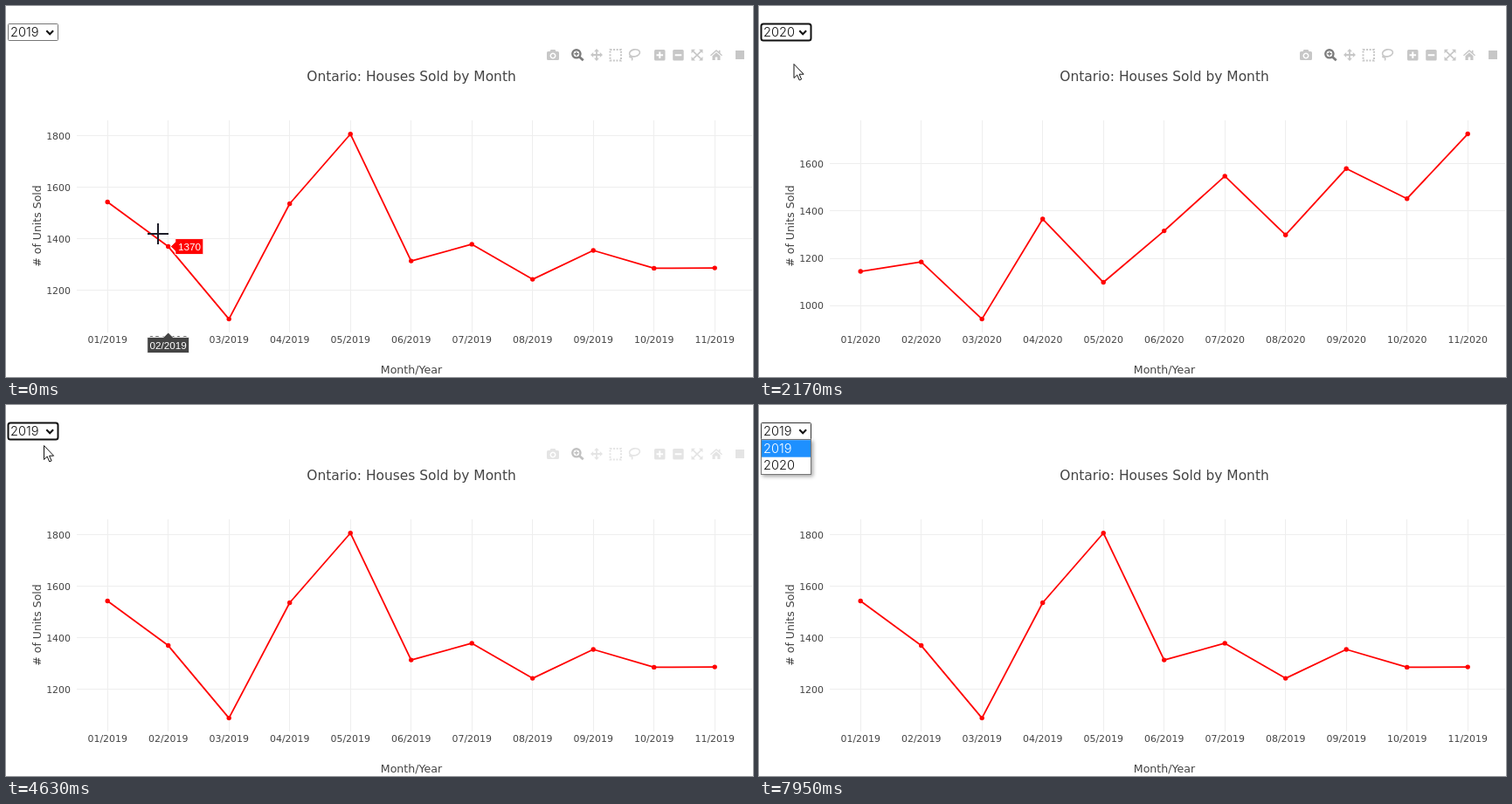
Recreate the animation shown at these times as an HTML page. Size 855 px wide and 425 px high, loop 8430 ms.

```html
<!DOCTYPE html>
<html lang="en">
<head>
<meta charset="utf-8">
<title>Houses sold by month</title>
<style>
  html, body { margin: 0; width: 100%; height: 100%; overflow: hidden; background: #fff; }
  svg { display: block; }
  .chart text, .label { font-family: "DejaVu Sans", Verdana, sans-serif; fill: #444; }
  .tick { font-size: 10.95px; }
  .tip { font: 11.7px "Liberation Sans", Arial, sans-serif; fill: #fff; }
  .pick { font: 300 14.6px Inter, sans-serif; fill: #111; }
</style>
</head>
<body>
<svg id="stage" width="855" height="425" viewBox="0 0 855 425">
  <defs>
    <filter id="shade" x="-30%" y="-30%" width="180%" height="180%">
      <feDropShadow dx="2" dy="2" stdDeviation="2" flood-color="#000" flood-opacity=".35"/>
    </filter>
  </defs>

  <g id="charts"></g>
  <text class="label" x="464" y="86" font-size="15.45" text-anchor="middle">Ontario: Houses Sold by Month</text>
  <text class="label" x="464" y="421" font-size="12.6" text-anchor="middle">Month/Year</text>
  <text class="label" transform="translate(40 252) rotate(-90)" font-size="12.5" text-anchor="middle"># of Units Sold</text>

  <g id="hover">
    <g id="monthTip">
      <path d="M0 374l5.4 5.4h18.6v18.2h-48v-18.2h18.6z" fill="#444" stroke="#fff" stroke-width=".9"/>
      <text id="monthText" class="tip" y="392.7" text-anchor="middle"></text>
    </g>
    <g id="valueTip">
      <path d="M2.7 0l5.4-5.4v-3.6h32v18h-32v-3.6z" fill="#f00" stroke="#fff" stroke-width=".9"/>
      <text id="valueText" class="tip" x="11.3" y="4.2"></text>
    </g>
  </g>

  <g id="tools" fill="#c7c7c7" stroke="none">
    <path fill-rule="evenodd" d="M620.5 52h2l1-2h5l1 2h2q1.500 0 1.500 1.500v7q0 1.500-1.500 1.500h-11q-1.500 0-1.500-1.500v-7q0-1.500 1.500-1.500zM626 53.500a3.500 3.500 0 1 0 .01 0zM626 55a2 2 0 1 1-.01 0z"/>
    <g fill="none" stroke="#7c7c7c">
      <circle cx="652.900" cy="54.800" r="4.600" stroke-width="2.400"/>
      <path d="M656.500 58.500l4.200 3.700" stroke-width="2.800"/>
      <path d="M650.500 54.800h4.800m-2.400-2.400v4.800" stroke-width="1.400"/>
    </g>
    <path d="M676 49l3 3.200h-2.100v2.900h2.900v-2.100l3.200 3-3.200 3v-2.100h-2.900v2.900h2.100l-3 3.200-3-3.200h2.100v-2.900h-2.900v2.100l-3.200-3 3.200-3v2.100h2.900v-2.900h-2.100z"/>
    <rect x="691.500" y="50" width="12.500" height="12.500" fill="none" stroke="#c7c7c7" stroke-width="2" stroke-dasharray="2 1.570"/>
    <g fill="none" stroke="#c7c7c7" stroke-width="1.600">
      <ellipse cx="719.500" cy="53.800" rx="6" ry="4" transform="rotate(-12 719.500 53.800)"/>
      <path d="M715 56.500q-2.500 2 .3 2.300 2.500.5 1 3.500"/>
    </g>
    <rect x="742" y="50" width="12.500" height="12.500" rx="1.500"/>
    <rect x="763.200" y="50" width="12.500" height="12.500" rx="1.500"/>
    <path d="M744.500 56.300h7.600m-3.800-3.800v7.600M765.700 56.300h7.600" stroke="#fff" stroke-width="2"/>
    <path d="M784.500 49.800h4.500l-4.500 4.500zM797.500 49.800v4.500l-4.500-4.500zM784.500 62.500v-4.500l4.500 4.500zM797.500 62.500h-4.500l4.500-4.500z"/>
    <path d="M786 51.300l10 9.700m0-9.700l-10 9.700" stroke="#c7c7c7" stroke-width="1.700"/>
    <path d="M813 50l2.800 2.500v-1.700h1.700v3.200l2.500 2.300-.9 1-6.100-5.400-6.100 5.400-.9-1z"/>
    <path d="M808.500 57.200l4.500-4 4.500 4v4.800h-3.200v-3.400h-2.600v3.400h-3.200z"/>
    <rect x="835" y="51" width="10" height="10"/>
  </g>

  <rect id="box" x="2.500" y="20.500" width="57" height="19" fill="#fff"/>
  <text id="chosen" class="pick" x="5" y="35.300"></text>
  <path d="M46.300 28.300l3.900 3.900 3.900-3.900" fill="none" stroke="#111" stroke-width="2.100"/>

  <g id="list">
    <rect x="2.500" y="39.500" width="57" height="40" fill="#fff" stroke="#767676" filter="url(#shade)"/>
    <rect id="mark" x="3" width="56" height="19.500" fill="#1e90ff"/>
    <text id="first" class="pick" x="5" y="55">2019</text>
    <text id="second" class="pick" x="5" y="74.300">2020</text>
  </g>

  <path id="arrow" d="M.5.5v16l3.700-3.500 2.500 5.900 2.400-1-2.500-5.700h5z" fill="#fff" stroke="#111" stroke-width="1"/>
  <path id="cross" d="M-12 0h24M0-12v24" fill="none" stroke="#1c1c28" stroke-width="2"/>
</svg>

<script>
const LOOP = 8430;
const $ = id => document.getElementById(id);
const monthX = i => 116.2 + 69.5 * i;
const monthName = (i, year) => String(i + 1).padStart(2, "0") + "/" + year;

const series = {
  2019: { top: 1800, topY: 148.5, scale: 0.2955,
    units: [1543, 1370, 1089, 1536, 1806, 1314, 1379, 1243, 1355, 1286, 1287] },
  2020: { top: 1600, topY: 180.5, scale: 0.2715,
    units: [1145, 1185, 944, 1366, 1099, 1316, 1547, 1299, 1579, 1452, 1725] }
};
const unitY = (s, v) => s.topY + (s.top - v) * s.scale;

function chart(year) {
  const s = series[year];
  const pts = s.units.map((v, i) => [monthX(i), unitY(s, v)]);
  const snap = v => Math.floor(v) + 0.5;
  let grid = "", ticks = "";
  pts.forEach(([x], i) => {
    grid += `M${snap(x)} 131V374`;
    ticks += `<text class="tick" x="${x}" y="386" text-anchor="middle">${monthName(i, year)}</text>`;
  });
  for (let k = 0; k < 4; k++) {
    const v = s.top - 200 * k, y = unitY(s, v);
    grid += `M81 ${snap(y)}H854`;
    ticks += `<text class="tick" x="74" y="${y + 4}" text-anchor="end">${v}</text>`;
  }
  const dots = pts.map(([x, y]) => `<circle cx="${x}" cy="${y}" r="2.7" fill="#f00"/>`).join("");
  return `<g class="chart" id="chart${year}"><path d="${grid}" stroke="#eee" fill="none"/>
    <polyline points="${pts.join(" ")}" fill="none" stroke="#f00" stroke-width="1.8" stroke-linejoin="round"/>
    ${dots}${ticks}</g>`;
}
$("charts").innerHTML = chart(2019) + chart(2020);

// time, x, y of the pointer tip
const path = [
  [80, 174, 261], [560, 46, 45], [880, 42, 28], [1000, 42, 28], [1240, 39, 54],
  [1390, 39, 66], [1500, 39, 66], [1560, 39, 70], [1620, 39.5, 66], [2680, 39.5, 66],
  [2930, 42, 45], [3150, 42, 29], [3700, 42, 29], [3950, 41, 41], [4110, 42, 44],
  [4260, 43, 46], [5690, 43, 46], [5950, 42, 24], [7150, 42, 24], [7190, 42, 25],
  [7380, 42, 25], [7950, 840, 440]
];

function pointer(t) {
  const n = path.findIndex(p => p[0] > t);
  if (n === 0) return path[0].slice(1);
  if (n < 0) return path[path.length - 1].slice(1);
  const [t0, x0, y0] = path[n - 1], [t1, x1, y1] = path[n];
  const k = (t - t0) / (t1 - t0);
  return [x0 + (x1 - x0) * k, y0 + (y1 - y0) * k];
}

const within = (t, a, b) => t >= a && t < b;
const ramp = (t, from) => Math.min(1, Math.max(0, (t - from) / 300));
const show = (id, on) => $(id).setAttribute("display", on ? "inline" : "none");
const move = (id, x, y) => $(id).setAttribute("transform", `translate(${x} ${y})`);

// The toolbar fades in when the list closes and out when the pointer leaves the plot.
const toolbar = t => 1 - ramp(t, 540) + ramp(t, 1860) - ramp(t, 2920) + ramp(t, 4490) - ramp(t, 5760);

function draw(t) {
  const [x, y] = pointer(t);
  const year = within(t, 1860, 4490) ? 2020 : 2019;
  const open = within(t, 940, 1860) || within(t, 3430, 4490) || t >= 6220;
  const focused = !open && t >= 1860;
  const inPlot = t < 880 && x > 81 && y > 131;

  show("chart2019", year === 2019);
  show("chart2020", year === 2020);
  $("tools").setAttribute("opacity", toolbar(t));

  const box = $("box");
  box.setAttribute("stroke", focused ? "#101010" : open ? "#333" : "#767676");
  box.setAttribute("stroke-width", focused ? 2 : 1);
  box.setAttribute("rx", focused ? 2.5 : 1);
  $("chosen").textContent = year;

  show("list", open);
  const low = within(t, 1315, 1860) || within(t, 3430, 3900);
  $("mark").setAttribute("y", low ? 59.7 : 40.2);
  $("first").style.fill = low ? "" : "#fff";
  $("second").style.fill = low ? "#fff" : "";

  show("hover", inPlot);
  if (inPlot) {
    const i = Math.round((x - monthX(0)) / 69.5), v = series[2019].units[i];
    move("monthTip", monthX(i), 0);
    move("valueTip", monthX(i), unitY(series[2019], v));
    $("monthText").textContent = monthName(i, 2019);
    $("valueText").textContent = v;
  }
  show("cross", inPlot);
  show("arrow", !inPlot && t < 7950);
  move("cross", x, y);
  move("arrow", x, y);
}

const start = performance.now();
function tick() {
  draw((performance.now() - start) % LOOP);
  requestAnimationFrame(tick);
}
tick();
</script>
</body>
</html>
```
